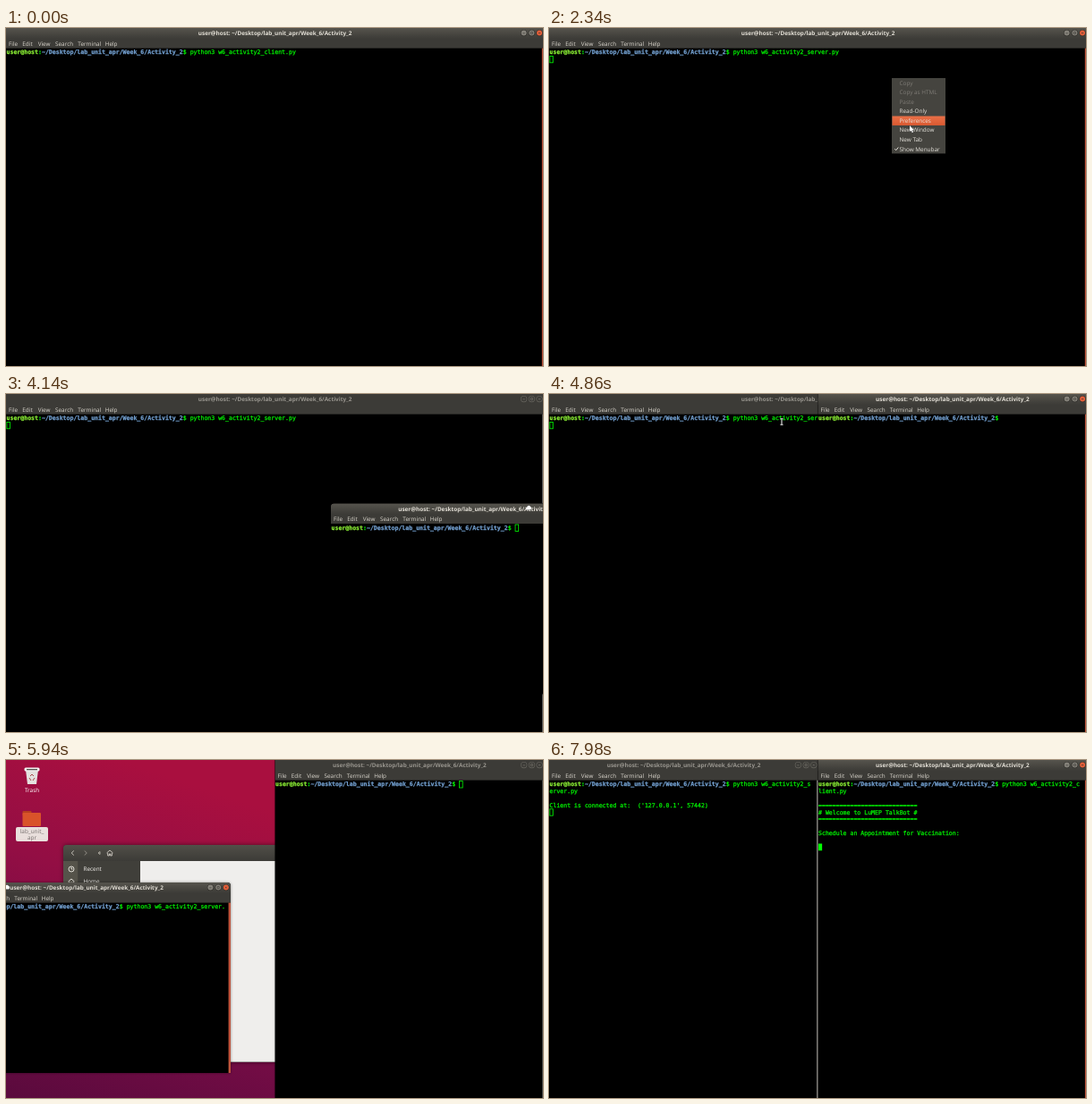
These frames come from a looping animation (600 by 378 pixels, 8 s). An HTML page with a canvas:

```html
<!DOCTYPE html>
<html lang="en">
<head>
<meta charset="utf-8">
<title>Two terminals</title>
<style>
  html, body { margin: 0; width: 100%; height: 100%; overflow: hidden; background: #000; }
  canvas { display: block; }
</style>
</head>
<body>
<canvas id="stage" width="600" height="378"></canvas>
<script>
const ctx = document.getElementById('stage').getContext('2d');
ctx.textRendering = 'geometricPrecision';

const LOOP = 8000, STEP = 60;
const CELL = 3.945, ROW = 7.8, TERM_TOP = 23.3;
const UI = '6.4px "Open Sans", "Noto Sans", sans-serif';
const MONO = '6.55px "DejaVu Sans Mono", monospace';
const GREEN = '#00f400', ORANGE = '#c0553d', PANEL = '#3c3b37';

const USER = 'user@host', PATH = '~/Desktop/lab_unit_apr/Week_6/Activity_2';
const PROMPT = `${USER}:${PATH}$ `;
const SERVER = PROMPT + 'python3 w6_activity2_server.py';
const CLIENT = PROMPT + 'python3 w6_activity2_client.py';
const RULE = '='.repeat(28);
const WELCOME = ['', RULE, '# Welcome to LuMEP TalkBot #', RULE, '',
  'Schedule an Appointment for Vaccination:', '', ''];

// Moments of the story in ms
const T = { recall: 360, run: 720, menu: 1800, menuShut: 2580, open: 2700, drag: 3500, snapRight: 4380,
  focusLeft: 5040, restore: 5460, follow: 5760, snapLeft: 6000, focusRight: 6760, recall2: 6900,
  run2: 7560, reply: 7680 };
const blinkResets = [-700, T.recall, T.run, T.open, T.focusLeft, T.snapLeft, T.focusRight, T.recall2, T.run2, T.reply];

// Mouse path: time, x, y, shape
const mousePath = [
  [0, 372, 35, ''], [960, 372, 35, 'beam'], [1620, 383, 56, 'beam'], [1800, 383, 56, 'arrow'],
  [2340, 403, 109, 'arrow'], [2480, 405, 114, 'arrow'], [2700, 405, 114, 'beam'], [3360, 222, 5, 'arrow'],
  [3500, 222, 5, 'hand'], [4140, 584, 127, 'hand'], [4380, 599, 135, 'beam'], [4860, 260, 31, 'beam'],
  [5040, 245, 6, 'arrow'], [5220, 245, 6, 'hand'], [5460, 215, 40, 'hand'], [5700, 109, 137, 'hand'],
  [5940, 1, 142, 'hand'], [6000, -4, 142, 'beam'], [6300, -4, 142, 'beam'], [6700, 505, 62, 'beam'],
  [6780, 517, 58, 'beam'], [7560, 517, 58, ''], [LOOP, 517, 58, '']
];

function mouseAt(t) {
  const i = mousePath.findIndex(key => key[0] > t);
  const [t0, x0, y0, shape] = mousePath[i - 1], [t1, x1, y1] = mousePath[i];
  const k = (t - t0) / (t1 - t0);
  return { x: x0 + (x1 - x0) * k, y: y0 + (y1 - y0) * k, shape };
}

function rect(x, y, w, h, color) {
  ctx.fillStyle = color;
  ctx.fillRect(x, y, w, h);
}

function roundBox(x, y, w, h, radius, color) {
  ctx.fillStyle = color;
  ctx.beginPath();
  ctx.roundRect(x, y, w, h, radius);
  ctx.fill();
}

function disc(x, y, r, color) {
  ctx.fillStyle = color;
  ctx.beginPath();
  ctx.arc(x, y, r, 0, 7);
  ctx.fill();
}

function text(str, x, y, color, font = UI, align = 'left') {
  ctx.font = font;
  ctx.fillStyle = color;
  ctx.textAlign = align;
  ctx.fillText(str, x, y);
}

// Terminal glyphs are a little heavier than the plain font
function monoText(str, x, y, color, weight) {
  text(str, x, y, color, weight + MONO);
  ctx.strokeStyle = color;
  ctx.lineWidth = 0.25;
  ctx.strokeText(str, x, y);
}

function shade(x0, y0, x1, y1, ...colors) {
  const g = ctx.createLinearGradient(x0, y0, x1, y1);
  colors.forEach((c, i) => g.addColorStop(i / (colors.length - 1), c));
  return g;
}

function drawPath(d, x, y, color, width = 0.9, filled = false) {
  const path = new Path2D(d);
  ctx.save();
  ctx.translate(x, y);
  ctx.strokeStyle = ctx.fillStyle = color;
  ctx.lineWidth = width;
  ctx.stroke(path);
  if (filled) ctx.fill(path);
  ctx.restore();
}

// Sidebar entries: label, icon, filled
const places = [
  ['Recent', 'M3 0A3 3 0 1 1-3 0A3 3 0 1 1 3 0M0-2V0H1.5'],
  ['Home', 'M-3.5 0L0-3L3.5 0M-2.3 0V3H-.7V1H.7V3H2.3V0'],
  ['Desktop', 'M-3 2.5V-2.5H0L1-1.5H3V2.5Z', true],
  ['Documents', 'M-2.2-3H.8L2.2-1.5V3H-2.2Z'],
  ['Downloads', 'M0-3V2.5M-2.4 0L0 2.6L2.4 0'],
  ['Music', 'M-1.5 2V-2.5H2.5V1.5M-2.8 2H-1.3M1.2 1.7H2.7'],
  ['Pictures', 'M-3-1.7H-1L-.5-2.5H.8L1.3-1.7H3V2.3H-3ZM1 .3A1 1 0 1 0-1 .3A1 1 0 1 0 1 .3', true],
  ['Videos', 'M-2.8-1.6H1.3V1.6H-2.8ZM1.5 0L3-1.5V1.5Z', true],
  ['Trash', 'M-2.5-2.5H2.5M-2.3-1.5H2.3V3H-2.3ZM-.8-.5V2M.8-.5V2'],
  ['Other Locations', 'M-2.2 0H2.2M0-2.2V2.2']
];

function drawDesktop() {
  rect(0, 0, 600, 378, shade(130, 0, 0, 378, '#a90f3f', '#930e44', '#740c45', '#5a0a3d'));
  // Trash bin
  ctx.fillStyle = '#e4e2df';
  ctx.fill(new Path2D('M22 11H36L34 27H24Z'));
  roundBox(20.5, 8.5, 17, 4, 1.5, '#f4f3f1');
  rect(23, 10, 12, 1.3, '#55534f');
  drawPath('M-2-2L0-4L2-2M3 0L1 3M-3 0L-1 3', 29, 20, '#a03a3a');
  text('Trash', 29, 35.6, '#fff', UI, 'center');
  // Selected folder
  roundBox(18.5, 57, 10, 5, 1, '#b8401e');
  roundBox(18.5, 59, 20.5, 15, 1, '#d9532a');
  roundBox(11, 75, 36, 16, 2, '#e9dfdc');
  text('lab_unit_', 29, 82, '#77706e', UI, 'center');
  text('apr', 29, 89, '#77706e', UI, 'center');
}

function drawFiles() {
  ctx.save();
  ctx.shadowColor = 'rgba(0,0,0,.5)';
  ctx.shadowBlur = 5;
  roundBox(64, 95, 300, 243, [4, 4, 0, 0], PANEL);
  ctx.restore();
  roundBox(64, 95, 300, 18, [4, 4, 0, 0], shade(0, 95, 0, 113, '#514f48', PANEL));
  rect(64, 113, 16.5, 225, '#55534a');
  rect(80.5, 113, 69.5, 225, '#403f3a');
  rect(150, 113, 214, 224.6, '#efeeec');
  drawPath('M1.3-2.5L-1.3 0L1.3 2.5', 74.5, 104, '#d5d1c8');
  drawPath('M-1.3-2.5L1.3 0L-1.3 2.5', 89, 104, '#99958c');
  drawPath('M1-1.5L-1 0L1 1.5Z', 104, 104, '#b5b1a8');
  drawPath(places[1][1], 116, 104, '#d5d1c8');
  places.forEach(([name, icon, filled], i) => {
    const y = 122 + i * 14 + (i === 9 ? 4 : 0);
    drawPath(icon, 73, y, '#f0ede6', 0.9, filled);
    text(name, 86.5, y + 2.3, '#f4f2ee');
  });
}

function wrap(lines, cols) {
  return lines.flatMap(line => line.match(new RegExp(`.{1,${cols}}`, 'g')) || ['']);
}

function drawButtons(right, focused) {
  const glyphs = ['M-1.2.3H1.2', 'M-1.1-1.1H1.1V1.1H-1.1Z', 'M-1-1L1 1M1-1L-1 1'];
  [22.6, 13.8, 5.2].forEach((gap, i) => {
    const x = right - gap, y = 5.6;
    disc(x, y, 3.6, focused ? '#2e2d29' : '#6a6861');
    disc(x, y, 3, !focused ? PANEL : i === 2 ? '#e8603a' : '#85827a');
    drawPath(glyphs[i], x, y, focused ? '#33322e' : '#7c7972', 0.6);
  });
}

function drawTerminal({ x, y, w, h, lines, focused, grabbed, blinkOn, barWidth = w, barShift = 0 }) {
  const corners = h < 300 ? [4, 4, 0, 0] : 0;
  ctx.save();
  ctx.translate(x, y);
  ctx.save();
  ctx.shadowColor = 'rgba(0,0,0,.45)';
  ctx.shadowBlur = 3;
  roundBox(0, 0, w, h, corners, '#000');
  ctx.restore();
  ctx.beginPath();
  ctx.roundRect(0, 0, w, h, corners);
  ctx.clip();

  // Title bar, menu bar, scroll bar
  rect(0, 0, w, 22.6, PANEL);
  if (focused) rect(0, 0, w, 12, shade(0, 0, 0, 12, '#56544d', PANEL));
  text(`${USER}: ${PATH}`, barWidth / 2, 8.1 + barShift, focused ? '#e2ded5' : '#98958e', 'bold ' + UI, 'center');
  drawButtons(barWidth, focused);
  [['File', 3], ['Edit', 18.3], ['View', 35.7], ['Search', 55], ['Terminal', 80.3], ['Help', 110.7]]
    .forEach(([label, lx]) => text(label, lx, 19.7, '#dbd7ce'));
  const bar = focused ? 2.4 : 1.8;
  rect(w - bar, 22.6, bar, h, focused ? ORANGE : '#a3a19b');

  // Text
  const rows = wrap(lines, Math.floor((w - 6) / CELL));
  const runs = [[0, 9, '#8aee34', 'bold '], [9, 10, GREEN, 'bold '], [10, 50, '#729fcf', 'bold '], [50, 99, GREEN, '']];
  rows.forEach((row, r) => {
    const base = TERM_TOP + r * ROW + 6.1;
    for (const [from, to, color, weight] of r ? [[0, 99, GREEN, '']] : runs)
      monoText(row.slice(from, to), 0.5 + from * CELL, base, color, weight);
  });

  // Cursor
  const cx = 0.5 + rows.at(-1).length * CELL, cy = TERM_TOP + (rows.length - 1) * ROW;
  if (!focused || grabbed) {
    ctx.strokeStyle = '#00ff00';
    ctx.lineWidth = 0.8;
    ctx.strokeRect(cx + 0.4, cy + 0.3, CELL - 0.3, ROW - 0.4);
  } else if (blinkOn) {
    rect(cx, cy, CELL + 0.2, ROW, '#00ff00');
  }
  ctx.restore();
}

const menuItems = ['Copy', 'Copy as HTML', 'Paste', 'Read-Only', 'Preferences', 'New Window', 'New Tab', 'Show Menubar'];

function drawMenu(t) {
  rect(383, 56, 60, 84.4, '#45443f');
  const hover = Math.floor((mouseAt(t - STEP).y - 55.6) / 10.5);
  menuItems.forEach((label, i) => {
    const mid = 61.6 + i * 10.53;
    if (i === hover && i > 2) rect(383.5, mid - 5.2, 59, 10.4, shade(0, mid - 5, 0, mid + 5, '#e86f47', '#dc5a31'));
    text(label, 391.5, mid + 2.2, i < 3 ? '#7f7c76' : '#e6e3dc');
  });
  drawPath('M-2 0L-.6 1.5L2-1.7', 388.3, 135.2, '#e6e3dc', 1);
}

function drawMouse({ x, y, shape }) {
  ctx.save();
  ctx.translate(x, y);
  ctx.lineWidth = 0.6;
  if (shape === 'beam') {
    const bar = 'M-1.5-3.3H1.5M0-3.3V3.3M-1.5 3.3H1.5';
    drawPath(bar, 0, 0, '#333', 1.8);
    drawPath(bar, 0, 0, '#e8e8e8', 0.9);
  } else if (shape) {
    const outline = new Path2D(shape === 'arrow'
      ? 'M0 0V7L1.6 5.6L2.8 8.2L4 7.6L2.9 5.2H5Z'
      : 'M-3 1.8Q-3.8 0-1.8-.4Q-1.6-2.4 0-2.2Q1.6-2.6 1.8-1Q3.4-1 3 1L2.4 2.6H-2.2Z');
    ctx.fillStyle = '#fff';
    ctx.strokeStyle = '#222';
    ctx.stroke(outline);
    ctx.fill(outline);
  }
  ctx.restore();
}

function leftWindow(t, mouse) {
  const lines = [t < T.recall ? CLIENT : SERVER];
  if (t >= T.run) lines.push('');
  if (t >= T.reply) lines.push("Client is connected at:  ('127.0.0.1', 57442)", '');
  const focused = t < T.open || (t >= T.focusLeft && t < T.focusRight);
  const win = { x: 0, y: 0, w: 601.2, h: 378, lines, focused };
  win.grabbed = (t >= T.menu && t < T.menuShut) || (t >= T.focusLeft && t < T.snapLeft);
  if (t >= T.snapLeft) win.w = 301;
  else if (t >= T.follow) Object.assign(win, { x: mouse.x - 72, y: mouse.y - 5, w: 322, h: 213 });
  // Just restored: the title bar still has its wide layout
  else if (t >= T.restore) Object.assign(win, { x: 115.5, w: 322, h: 213, barWidth: 592, barShift: -3.6 });
  return win;
}

function rightWindow(t, mouse) {
  const lines = [t < T.recall2 ? PROMPT : CLIENT];
  if (t >= T.run2) lines.push('');
  if (t >= T.reply) lines.splice(1, 1, ...WELCOME);
  const focused = t < T.focusLeft || t >= T.focusRight;
  const win = { x: 300.5, y: 0, w: 300.8, h: 378, lines, focused };
  if (t < T.snapRight) {
    const dragging = t >= T.drag;
    Object.assign(win, { x: dragging ? mouse.x - 221 : 1, y: dragging ? mouse.y - 4.6 : 0.4,
      w: 322, h: 213, grabbed: dragging });
  }
  return win;
}

function draw(t) {
  const mouse = mouseAt(t);
  const lastReset = blinkResets.findLast(r => r <= t);
  const blinkOn = (t - lastReset) % 1200 < 600;
  drawDesktop();
  drawFiles();
  const windows = [leftWindow(t, mouse)];
  if (t >= T.open) windows.push(rightWindow(t, mouse));
  windows.sort((a, b) => a.focused - b.focused)
    .forEach(win => drawTerminal({ ...win, blinkOn }));
  if (t >= T.menu && t < T.menuShut) drawMenu(t);
  drawMouse(mouse);
}

function tick() {
  const t = performance.now() % LOOP;
  draw(Math.floor(t / STEP) * STEP);
  requestAnimationFrame(tick);
}
tick();
</script>
</body>
</html>
```
